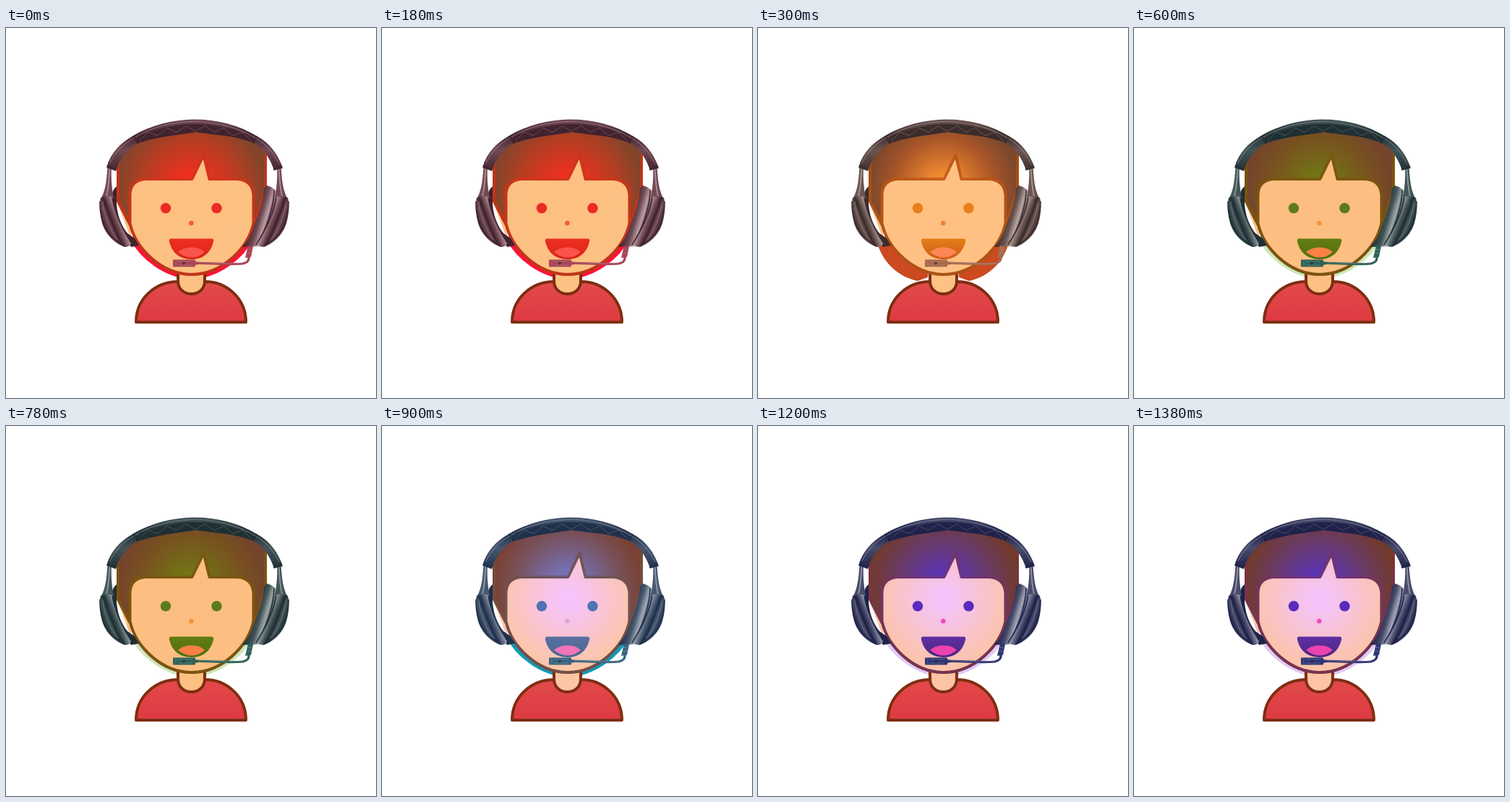
Recreate the animation shown at these times as an HTML page. Size 512 by 512 pixels, loop 1500 ms.

```html
<!DOCTYPE html>
<html lang="en">
<head>
<meta charset="utf-8">
<title>Headset avatar</title>
<style>
  html, body { margin: 0; width: 100%; height: 100%; overflow: hidden; background: #fff; }
  svg { display: block; width: 100vw; height: 100vh; }
  path { stroke-linejoin: round; }
  .hair { fill: url(#hairFill); }
  .outline { fill: none; stroke: url(#edgeFill); stroke-width: 4; }
  .skin { fill: url(#skinFill); }
  .eye { fill: var(--eye); }
  .dark { fill: var(--dark); }
  .thin { fill: none; stroke: var(--mid); stroke-width: 1; }
  .seam { fill: none; stroke: var(--dark); stroke-width: 1.5; }
  .shine { fill: none; stroke: var(--light); }
  .mic { fill: var(--mic); }
  .cloth { stroke: #7f2e11; stroke-width: 4; }
</style>
</head>
<body>
<svg id="stage" viewBox="0 0 512 512">
  <defs>
    <radialGradient id="hairFill" gradientUnits="userSpaceOnUse" cx="257" cy="222" r="108">
      <stop offset="0" style="stop-color:var(--hair)"/>
      <stop offset=".18" style="stop-color:var(--hair)"/>
      <stop offset=".65" style="stop-color:var(--hairMid)"/>
      <stop offset=".95" style="stop-color:var(--hairEdge)"/>
    </radialGradient>
    <radialGradient id="edgeFill" gradientUnits="userSpaceOnUse" cx="257" cy="245" r="125">
      <stop offset=".3" style="stop-color:var(--line)"/>
      <stop offset="1" style="stop-color:var(--lineEdge)"/>
    </radialGradient>
    <radialGradient id="skinFill" gradientUnits="userSpaceOnUse" cx="257" cy="240" r="105">
      <stop offset=".1" style="stop-color:var(--skin)"/>
      <stop offset=".95" style="stop-color:var(--skinEdge)"/>
    </radialGradient>
    <linearGradient id="shirtFill" x2="0" y2="1">
      <stop offset="0" stop-color="#e34a4a"/>
      <stop offset="1" stop-color="#dc3a42"/>
    </linearGradient>
    <linearGradient id="mouthFill" x2="0" y2="1">
      <stop offset="0" style="stop-color:var(--mouth)"/>
      <stop offset="1" style="stop-color:var(--mouthLow)"/>
    </linearGradient>
    <linearGradient id="capFill" gradientUnits="userSpaceOnUse" x1="131" y1="268" x2="163" y2="255">
      <stop offset="0" style="stop-color:var(--dark)"/>
      <stop offset=".3" style="stop-color:var(--mid)"/>
      <stop offset=".42" style="stop-color:var(--dark)"/>
      <stop offset=".58" style="stop-color:var(--mid)"/>
      <stop offset=".76" style="stop-color:var(--light)"/>
      <stop offset="1" style="stop-color:var(--mid)"/>
    </linearGradient>
    <linearGradient id="padFill" gradientUnits="userSpaceOnUse" x1="343" y1="255" x2="373" y2="264">
      <stop offset="0" style="stop-color:var(--dark)"/>
      <stop offset=".35" style="stop-color:var(--mid)"/>
      <stop offset=".6" style="stop-color:var(--light)" stop-opacity=".85"/>
      <stop offset=".85" style="stop-color:var(--dark)"/>
    </linearGradient>
    <linearGradient id="bandFill" x2="0" y2="1">
      <stop offset="0" style="stop-color:var(--mid)"/>
      <stop offset=".3" style="stop-color:var(--dark)"/>
      <stop offset=".6" style="stop-color:var(--mid)"/>
      <stop offset="1" style="stop-color:var(--dark)"/>
    </linearGradient>
    <g id="cup">
      <path d="M140.5 193H146C145 210 147 222 149 237H131C138 224 139 212 140.5 193Z" style="fill:var(--mid)"/>
      <path class="shine" d="M143.5 195C142 212 142 224 138 236" stroke-width="1.8"/>
      <path d="M131 235Q138 230 147 234C150 254 161 278 173 296Q174 302 165 303C151 299 138 286 133 270Q127 248 131 235Z" fill="url(#capFill)"/>
      <path class="shine" d="M134 240C136 262 143 280 156 294" opacity=".5"/>
      <path class="seam" d="M147 235C150 254 161 278 173 297M137 236C141 259 149 281 163 300M130 240Q131 266 140 280T164 302"/>
    </g>
  </defs>

  <path d="M164 294C171 322 192 344 221 350L235 345V338H278V345L292 350C321 344 341 322 348 294Z" style="fill:var(--glow);opacity:var(--wide)"/>
  <path d="M176 291C188 316 222 343 257 343C292 343 326 316 338 291" fill="none" stroke-width="8" style="stroke:var(--glow);opacity:var(--rim)"/>

  <path class="cloth" d="M180 407C180 374 207 351 238 351H276C305 351 332 374 332 407Z" fill="url(#shirtFill)"/>
  <path d="M238 336V350C238 374 275 374 275 350V336Z" style="fill:var(--skinEdge)"/>
  <path class="cloth" d="M238 338V350C238 374 275 374 275 350V338" fill="none"/>

  <path class="skin" d="M152 236L173 292V232Z"/>
  <path class="hair" d="M155 240V182L180 152Q262 130 343 152L359 170V230L341 277V230H173V270Z"/>
  <path class="outline" d="M155 187V240L172 273M359 174V225L342 275" stroke-width="3"/>
  <path class="outline" d="M171.5 270V231Q172 211 192 209H257.500L273.500 176L281.500 209H321Q341 211 342.500 231V270C335 305 299 341 257 341C215 341 179 305 171.500 270Z" style="fill:url(#skinFill)"/>

  <circle class="eye" cx="221" cy="249.3" r="7.2"/>
  <circle class="eye" cx="291.5" cy="249.3" r="7.2"/>
  <circle cx="256.3" cy="270" r="3.3" style="fill:var(--nose)"/>
  <path d="M228 291.5H285Q288 292 287 296C283 312 272 320 257 320C241 320 230 312 226 296Q225 292 228 291.5Z" fill="url(#mouthFill)"/>
  <path d="M238 310Q246 303.500 257 303.500T275 310Q267 317.500 257 317.500T238 310Z" style="fill:var(--tongue)"/>

  <path class="dark" d="M153 219Q147 224 146 234C151 260 163 286 173 303L184 301L178 291L168 284C160 274 154 260 153 243Z"/>
  <path d="M361 218Q374 221 378 233C374 263 365 286 354 302L327 303Q338 291 343 274C350 256 356 240 357 222Z" fill="url(#padFill)"/>
  <path class="seam" d="M371 224C370 252 359 281 346 300"/>
  <use href="#cup"/>
  <use href="#cup" transform="translate(521 0) scale(-1 1)"/>

  <path d="M139 193C145 173 157 160 176 149C201 134 234 126.500 262 126.500C291 126.500 322 134 348 150C366 160 377 176 383 194L371 197C365 179 356 167 343 159Q320 151 303 149Q282 147 263 144Q241 147 221 150Q199 154 180 160C166 170 157 181 152 198Z" fill="url(#bandFill)"/>
  <path class="dark" d="M181 153Q220 133 262 133T343 153V159Q318 150 303 149L263 144L221 150Q198 154 180 160Z"/>
  <path id="quilt" class="thin"/>
  <path class="shine" d="M144 187C152 169 164 159 179 151C203 136 235 129.500 262 129.500S320 137 345 152C361 161 371 174 378 188" stroke-width="1.2" opacity=".55"/>
  <path class="seam" d="M177 150L183 160M347 150L342 160M140 191L152 196M382 191L370 196"/>

  <path d="M262 325.5C287 325 309 328 328 326Q339 323 335 314" fill="none" stroke-width="3.2" style="stroke:var(--mic)"/>
  <path d="M266 325C287 324.5 309 327 328 325" class="shine" stroke-width=".8" opacity=".7"/>
  <path class="mic" d="M335 301L342 302L339 317L331 318Z"/>
  <path class="shine" d="M334 306L340 307M333 311L339 312" opacity=".6"/>
  <rect class="mic" x="231" y="320.5" width="31" height="10" rx="1"/>
  <path class="mic" d="M261 323L267 324V327L261 328Z"/>
  <path class="shine" d="M235 321V330M238 323H258M238 328H258" opacity=".45"/>
  <circle class="dark" cx="246" cy="325.5" r="2" opacity=".7"/>
</svg>
<script>
  const stage = document.getElementById('stage');
  const STEP = 300;
  const keys = ('hair hairMid hairEdge line lineEdge skin skinEdge eye nose mouth mouthLow ' +
    'tongue dark mid light mic glow rim wide').split(' ');

  // One colour theme per step, in the order of keys.
  const themes = [
    '#f03020 #b13e22 #82452b #d8331c #b5371a #fdc080 #fcc183 #ed2a25 #f35a38 #ee3022 #d92313 #fb544c #40232f #714a54 #ad8c94 #a84454 #ff1238 1 0',
    '#f28930 #a85528 #7c482c #c9601c #a04a12 #ffc080 #ffc184 #e87e1c #ec8238 #e57e1a #cd5a14 #fc8656 #3b2d2c #6b5653 #aa9690 #a8694c #cb4a20 .2 1',
    '#717515 #78521f #74432c #795a0d #7d4f12 #fdbd80 #fdbf82 #5c7b1b #f39336 #647c12 #4f7010 #fb8044 #202f33 #435559 #8d9797 #2d6258 #78b83c .35 0',
    '#7672b8 #78525f #7a4234 #6f5868 #754a34 #f7c3fb #fcc6a4 #5072b0 #dba4d6 #5c70a4 #44698c #f074b8 #20304a #47586f #9199a8 #386481 #119ab5 1 0',
    '#5b34b3 #6b3b5e #713a2d #6b338a #7d352f #f5c3fa #fcc4a4 #592cbd #f247c4 #602fa4 #4b267e #ec43ae #1f2249 #484b6a #9394a8 #2e3573 #a56adf .35 0'
  ].map(row => row.split(' '));

  const bandY = x => 139 + ((x - 262) / 80) ** 2 * 14;
  let quilt = '';
  for (let i = 0; i <= 12; i++) {
    const x = 184 + i * 13;
    quilt += `${i ? 'L' : 'M'}${x} ${bandY(x) + (i % 2 ? -4 : 4)}`;
  }
  document.getElementById('quilt').setAttribute('d', quilt);

  let shown = -1;
  function show(step) {
    if (step === shown) return;
    shown = step;
    keys.forEach((key, i) => stage.style.setProperty('--' + key, themes[step][i]));
  }

  const start = performance.now();
  function tick() {
    show(Math.floor((performance.now() - start) / STEP) % themes.length);
    requestAnimationFrame(tick);
  }
  tick();
</script>
</body>
</html>
```
